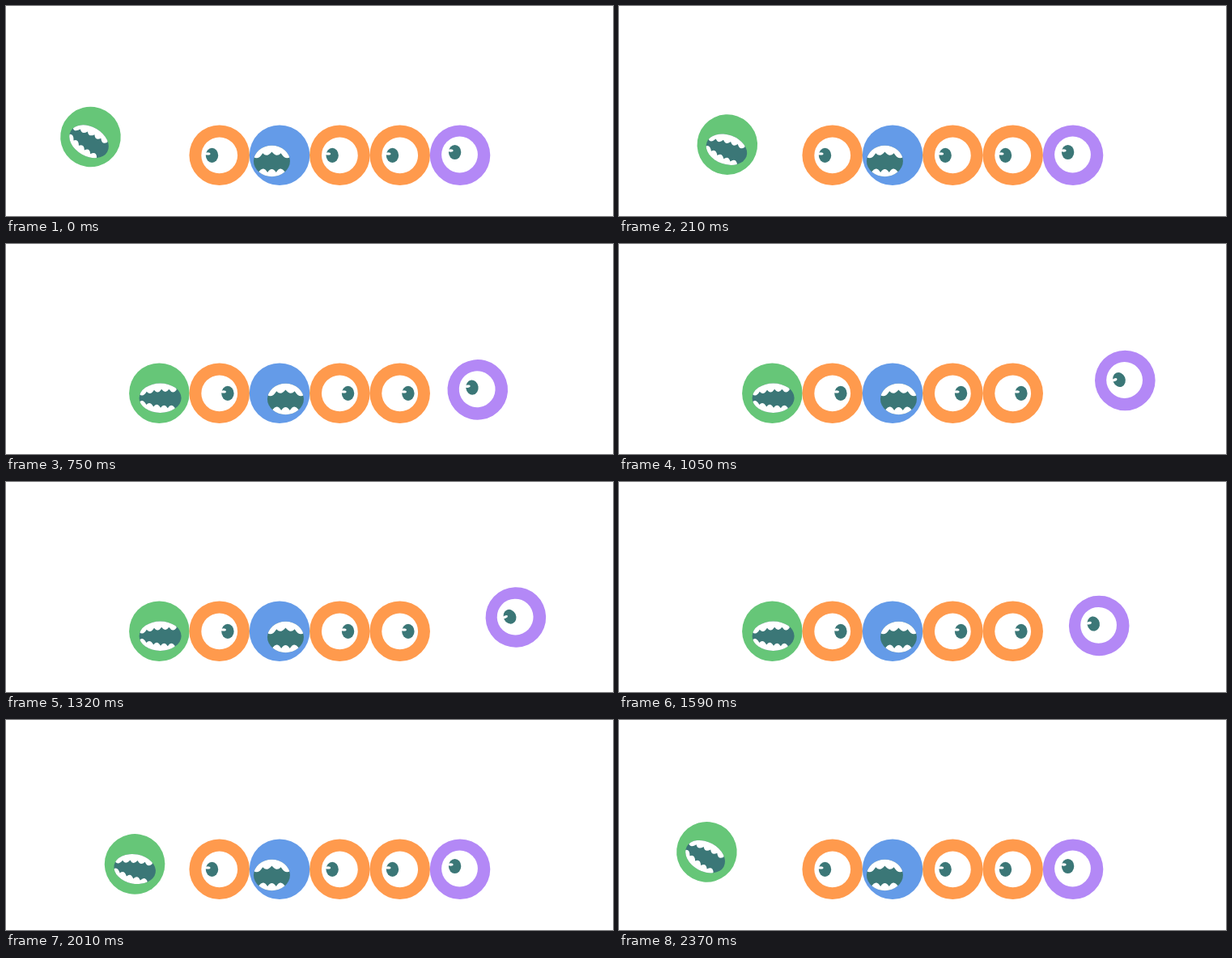
An HTML page with a canvas for the animation above (2400 ms loop, 750 by 260 pixels).

```html
<!DOCTYPE html>
<html lang="en">
<head>
<meta charset="utf-8">
<title>Monster cradle</title>
<style>
  html, body { margin: 0; width: 100%; height: 100%; overflow: hidden; background: #fff; }
  canvas { display: block; }
</style>
</head>
<body>
<canvas id="stage" width="750" height="260"></canvas>
<script>
const ctx = document.getElementById('stage').getContext('2d');
const LOOP = 2400, QUARTER = LOOP / 4, DEG = Math.PI / 180;
const RADIUS = 37.3, FIRST_X = 189.4, SPACING = 74.32, REST_Y = 184.7;
const ARC = 505, ARC_START = 10 * DEG, ARC_SWEEP = 10 * DEG, TILT = 30 * DEG;
const GREEN = '#66c678', ORANGE = '#ff9a4d', BLUE = '#649be8', PURPLE = '#b388f6';
const TEAL = '#3b7777', WHITE = '#fff';

function oval(x, y, rx, ry, color) {
  ctx.beginPath();
  ctx.ellipse(x, y, rx, ry, 0, 0, Math.PI * 2);
  ctx.fillStyle = color;
  ctx.fill();
}

// A row of rounded teeth along an arched gum line; positive bulge hangs down.
function teeth(x0, y0, x1, y1, arch, count, bulge) {
  const far = bulge > 0 ? -40 : 40;
  const at = u => [x0 + (x1 - x0) * u, y0 + (y1 - y0) * u + arch * 4 * u * (1 - u)];
  ctx.beginPath();
  ctx.moveTo(x0, far);
  ctx.lineTo(...at(0));
  for (let i = 1; i <= count; i++) {
    const [mx, my] = at((i - 0.5) / count);
    ctx.quadraticCurveTo(mx, my + bulge, ...at(i / count));
  }
  ctx.lineTo(x1, far);
  ctx.fillStyle = WHITE;
  ctx.fill();
}

function mouth(x, y, rx, ry, upper, lower) {
  ctx.save();
  ctx.translate(x, y);
  oval(0, 0, rx, ry, TEAL);
  ctx.clip();
  teeth(...upper);
  teeth(...lower);
  ctx.restore();
}

function eye(x, y, pupilX, pupilY) {
  oval(x, y, 22.4, 22.4, WHITE);
  oval(pupilX, pupilY, 7.7, 9.1, TEAL);
  oval(pupilX - 5.2, pupilY - 2, 3.2, 1.7, WHITE);
}

const greenFace = () => mouth(1.2, 6, 26, 18.2,
  [-26, -5, 20, -10, -3, 5, 6.5], [-26, 5, 18, 12, 3, 5, -6.5]);
const blueFace = right => mouth(right ? 7.4 : -9.6, 7.3, 22.5, 19.2,
  [-22.5, -5, 22.5, -5, -6.5, 4, 7], [-16, 13, 16, 13, 1, 3, -8]);
const orangeFace = right => eye(0, 0.2, right ? 10.2 : -9.2, 0.2);
const purpleFace = () => eye(-0.5, -0.7, -6.4, -3.7);

const balls = [
  [GREEN, greenFace], [ORANGE, orangeFace], [BLUE, blueFace],
  [ORANGE, orangeFace], [ORANGE, orangeFace], [PURPLE, purpleFace]
];

// How far each end ball is out: 0 at rest, 1 at the top; the right one returns a little slower.
const leftSwing = q => Math.max(0, 1 - q, q - 3);
const rightSwing = q => Math.max(0, Math.min(q - 1, (3.04 - q) / 1.04));

function draw(t) {
  const q = t / QUARTER;
  const right = q >= 1 && q < 3;
  const swings = [-leftSwing(q), 0, 0, 0, 0, rightSwing(q)];
  ctx.clearRect(0, 0, 750, 260);
  balls.forEach(([color, face], i) => {
    const swing = swings[i];
    const angle = ARC_START + ARC_SWEEP * Math.abs(swing);
    const dx = Math.sign(swing) * ARC * (Math.sin(angle) - Math.sin(ARC_START));
    const dy = ARC * (Math.cos(angle) - Math.cos(ARC_START));
    ctx.save();
    ctx.translate(FIRST_X + i * SPACING + dx, REST_Y + dy);
    ctx.rotate(-TILT * swing);
    oval(0, 0, RADIUS, RADIUS, color);
    face(right);
    ctx.restore();
  });
}

function tick() {
  draw(performance.now() % LOOP);
  requestAnimationFrame(tick);
}
tick();
</script>
</body>
</html>
```
